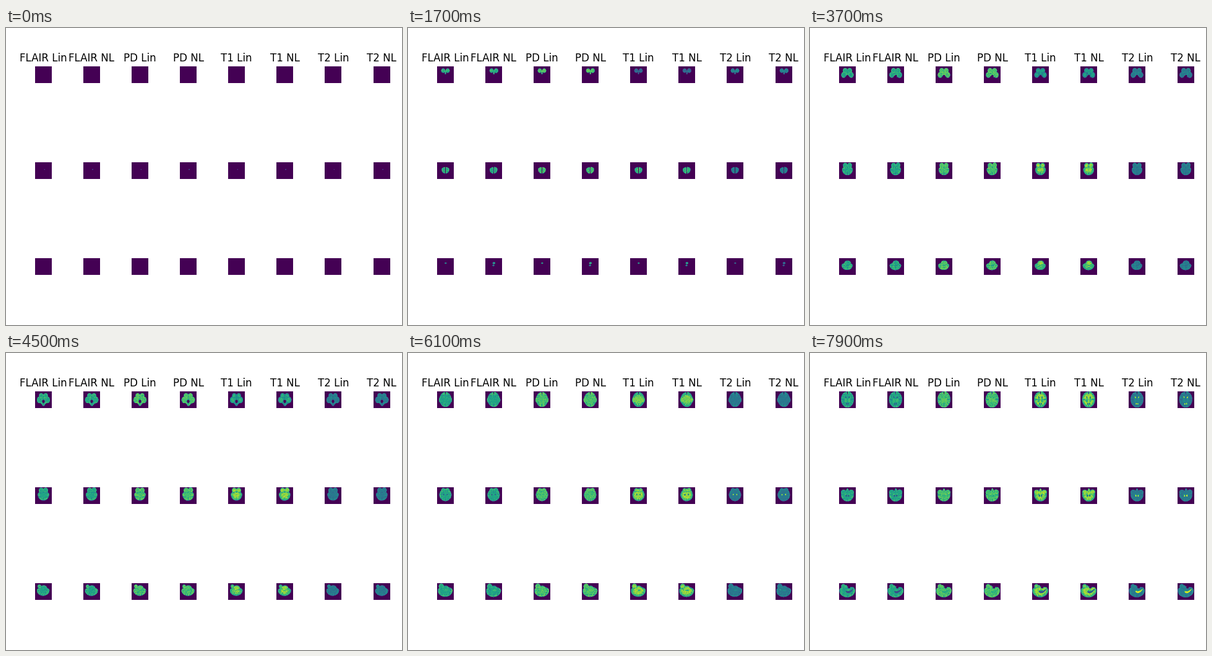
These frames come from a looping animation (640x480 px, 8000 ms). A matplotlib script:

```python
import numpy as np
import matplotlib.pyplot as plt
from matplotlib.animation import FuncAnimation

W, H, DPI = 640, 480, 100
FRAMES, STEP = 80, 100
TILE, SUB = 27, 3
FIELD = 180  # mm covered by one tile
LEFT, TOP, DX, DY = 46.55, 62, 78.15, 155
FITS = ("Lin", "NL")

# Mean brightness, grey over white contrast, fluid signal
SCANS = {
    "FLAIR": (0.63, 0.07, 0.35),
    "PD": (0.73, 0.03, 0.85),
    "T1": (0.75, -0.12, 0.35),
    "T2": (0.44, 0.08, 2.20),
}
BACK, GREY, WHITE, SULCUS, FLUID = range(5)

span = (np.arange(TILE * SUB) + 0.5) * FIELD / (TILE * SUB)
XS, YS, ZS = span - 90, span - 104, span - 72


def blob(p, center, radii):
    """Squared ellipsoid radius, below 1 inside."""
    return sum(((a - c) / r) ** 2 for a, c, r in zip(p, center, radii))


def tissue(x, y, z, warp):
    """Tissue class at each point of a stylised brain."""
    if warp:
        x = x * 0.985 + 1.5 * np.sin(0.05 * z + 1)
        y = (y + 17) * 0.998 - 17
        z = z * 0.985 + 1.5 * np.sin(0.06 * x)
    x, y, z = np.broadcast_arrays(x, y, z)
    side = np.abs(x)
    p, m = (x, y, z), (side, y, z)

    pole = 12 * np.clip((-92 - y) / 12, 0, 1)
    height = np.where(z > 5, 75, 42)  # domed top, flatter base
    cerebrum = blob((x - pole, y, z), (0, -17, 5), (69, 87, height))
    temporal = blob(m, (41, -12, -19), (31, 37, 29))
    frontal = blob(p, (0, 34, -14), (22, 28, 18))
    cortex = np.minimum(np.minimum(cerebrum, temporal), frontal)
    lobes = blob(m, (24, -58, -38), (26, 28, 30))
    vermis = blob(p, (0, -48, -38), (14, 20, 22))
    stem = blob(p, (0, -28, -33), (13, 14, 27))
    hind = np.minimum(np.minimum(lobes, vermis), stem)
    hole = blob(p, (0, 4, -28), (15, 18, 16)) < 1

    fold = (np.sin(0.31 * side + 1.7 * np.sin(0.14 * y) + 0.8 + 0.3 * np.sign(x))
            + np.sin(0.27 * y + 1.6 * np.sin(0.15 * z))
            + np.sin(0.29 * z + 1.5 * np.sin(0.12 * side)))
    deep = blob(m, (18, -8, 4), (13, 24, 12)) < 1
    cleft = (side < 3) & (cerebrum > 0.4)
    sylvian = (side > 34) & (np.abs(z + 0.4 * y) < 2.5) & (np.abs(y + 5) < 30)
    horn_x = 9 + 0.35 * np.maximum(0, -15 - y)
    horn_z = 24 - 0.012 * (y + 5) ** 2
    horns = blob((side - horn_x, y, z - horn_z), (0, -5, 0), (7.5, 56, 11)) < 1

    out = np.full(x.shape, BACK)
    out[(cortex < 1) & ~hole] = GREY
    inside = out == GREY
    out[inside & (cortex < 0.66 + 0.13 * fold) & ~deep] = WHITE
    out[inside & (cortex > 0.5) & (fold > 1.1)] = SULCUS
    out[inside & (cleft | sylvian)] = SULCUS
    out[inside & cleft & (y < -75)] = BACK
    below = cerebrum > 0.8
    out[(hind < 1) & below] = GREY
    out[(hind < 0.5 + 0.2 * np.sin(0.5 * z + 0.2 * y)) & below] = WHITE
    out[horns & (cerebrum < 0.8)] = FLUID
    return out


def slices(i, warp):
    axial = tissue(XS[None, :], YS[:, None], i - 72.0, warp)
    coronal = tissue(XS[None, :], i - 103.8, ZS[:, None], warp)
    sagittal = tissue(i - 88.0, YS[None, :], ZS[:, None], warp)
    return axial, coronal, sagittal


def level(scan, row, i):
    """Brightness of a view: fades in, and axial T1 gains as it climbs."""
    gain = min(1, 0.35 + i / 20)
    if scan == "T1" and row == 0:
        gain *= min(1, 0.3 + 0.0105 * i)
    return SCANS[scan][0] * gain


def signal(scan, classes):
    _, contrast, fluid = SCANS[scan]
    values = np.array([0, 1 + contrast, 1 - contrast, 0.75, fluid])
    return values[classes].reshape(TILE, SUB, TILE, SUB).mean(axis=(1, 3))


fig = plt.figure(figsize=(W / DPI, H / DPI), dpi=DPI)
ax = fig.add_axes([0, 0, 1, 1])
ax.axis("off")

columns = [(scan, fit) for scan in SCANS for fit in FITS]
tiles = {}
for col, (scan, fit) in enumerate(columns):
    left = LEFT + DX * col
    x0 = round(left)
    ax.text(left + TILE / 2, TOP - 8.3, f"{scan} {fit}",
            fontsize=12, ha="center", va="baseline")
    for row in range(3):
        top = TOP + DY * row
        tiles[row, scan, fit] = ax.imshow(
            np.zeros((TILE, TILE)), cmap="viridis", vmin=0, vmax=1,
            interpolation="nearest", aspect="auto",
            extent=(x0, x0 + TILE, top + TILE, top))
ax.set(xlim=(0, W), ylim=(H, 0))


def update(i):
    rng = np.random.default_rng(i)
    views = {fit: slices(i, fit == "NL") for fit in FITS}
    for (row, scan, fit), tile in tiles.items():
        grain = 1 + 0.06 * rng.standard_normal((TILE, TILE))
        image = level(scan, row, i) * grain * signal(scan, views[fit][row])
        tile.set_data(np.clip(image, 0, 1))
    return list(tiles.values())


anim = FuncAnimation(fig, update, frames=FRAMES, interval=STEP,
                     repeat=True, repeat_delay=0)
plt.show()
```
